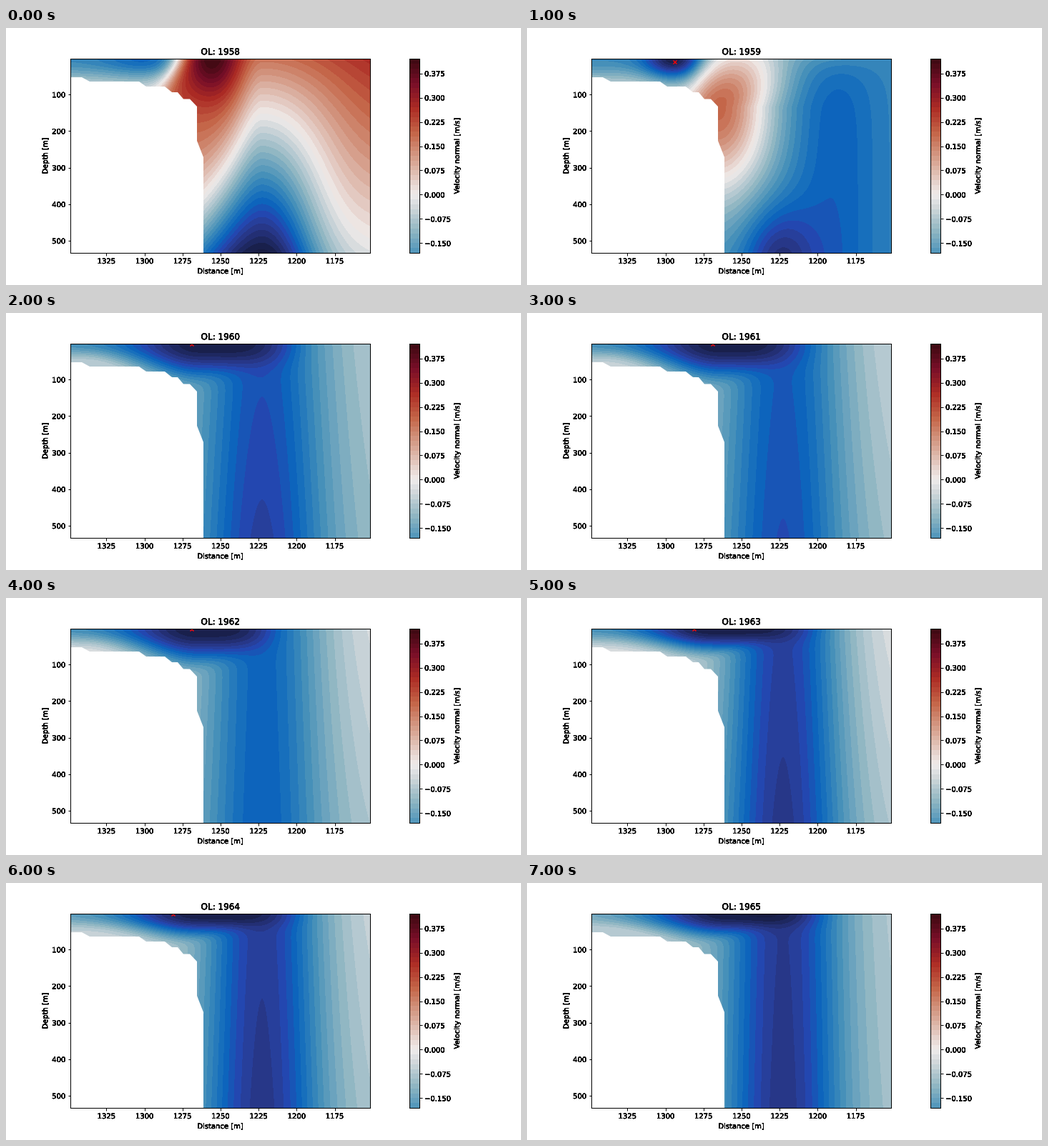
These frames come from a looping animation (720x360 px, 8000 ms). A matplotlib script:

```python
import numpy as np
import matplotlib.pyplot as plt
from matplotlib.animation import FuncAnimation
from matplotlib.colors import LinearSegmentedColormap, Normalize
from matplotlib.patheffects import Normal

W, H, DPI = 720, 360, 72
LEFT, RIGHT, TOP, BOTTOM = 90, 509.2, 43.2, 315
VMAX, STEP = 0.42, 0.02

# diverging blue / white / red map
STOPS = [
    (0, (23, 28, 66)), (0.091, (41, 58, 143)), (0.13, (36, 70, 176)),
    (0.182, (11, 102, 189)), (0.273, (69, 144, 185)), (0.364, (142, 181, 194)),
    (0.455, (210, 216, 219)), (0.5, (240, 236, 235)), (0.545, (230, 210, 204)),
    (0.636, (213, 157, 137)), (0.727, (196, 101, 72)), (0.818, (172, 43, 36)),
    (0.909, (120, 14, 40)), (1, (60, 9, 17)),
]
CMAP = LinearSegmentedColormap.from_list(
    "diverging", [(p, tuple(c / 255 for c in rgb)) for p, rgb in STOPS], N=512)
NORM = Normalize(-VMAX, VMAX)

# stage pixels; D is the depth below the surface, T the same from 0 to 1
X, Y = np.meshgrid(np.linspace(LEFT, RIGHT, 281), np.linspace(TOP, BOTTOM, 182))
D = Y - TOP
T = D / (BOTTOM - TOP)


def bell(v, mid, left, right=None):
    """Gaussian bump, with its own width on either side."""
    width = np.where(v < mid, left, left if right is None else right)
    return np.exp(-((v - mid) / width) ** 2)


def lerp(a, b):
    """Change from a at the surface to b at the bottom."""
    return a + (b - a) * T


# The fields are in percent of VMAX.

def join_shelf(open_sea, edge, flow, core, mid, width):
    """Put a cold current over the shelf, left of the slanting edge."""
    shelf = -(flow + core * bell(X, mid, width)) * bell(D, 0, 33)
    sea = 1 / (1 + np.exp((edge - 0.45 * D - X) / 9))
    return shelf + (open_sea - shelf) * sea


def arch():
    """Warm water above a cold dome, with a hot core at the surface."""
    dome = bell(X, 358, 35 + 70 * T ** 2, 80 + 50 * (1 - T) ** 2)
    sea = lerp(72, -3) - lerp(32, 100) * dome
    sea += 30 * bell(X, 288, 32) * bell(D, 0, 50)
    return join_shelf(sea, 243, 48, 16, 195, 60)


def wedge():
    """Cold sea with a warm wedge on the slope."""
    sea = -48 - 18 * bell(X, 430, 65) * (1 - np.exp(-D / 25))
    sea -= 38 * bell(X, 350, 50) * bell(Y, 330, 80)
    slant = 267 + 0.4 * np.maximum(110 - Y, 0)
    sea += 93 * bell(X, slant, 72) * bell(Y, 110, 90, 125)
    return join_shelf(sea, 248, 48, 52, 205, 40)


def jet(peak, rim, width, mid, shelf, spread, reach, depth):
    """Deep cold jet joined to a cold cap which thins out over the shelf."""
    rim = lerp(*rim)
    deep = rim + (lerp(*peak) - rim) * bell(X, 358, width)
    west = shelf + (100 - shelf) * bell(X, mid, spread)
    east = 100 * np.exp(-((X - mid) / reach) ** 4)
    s = np.clip((X - 110) / 160, 0, 1)
    thick = 22 + (depth - 22) * s * s * (3 - 2 * s)
    cap = np.where(X < mid, west, east) * bell(D, 0, thick)
    return -(deep ** 6 + cap ** 6) ** (1 / 6)


Y1960 = jet((69, 78), (15, 21), 95, 270, 43, 100, 153, 58)
Y1962 = jet((64, 66), (4, 15), 95, 265, 43, 98, 130, 55)
Y1963 = jet((77, 83), (2, 14), 92, 255, 43, 88, 165, 36)
Y1965 = jet((81, 84), (14, 18), 90, 280, 29, 115, 150, 38)

# field and position of the core marker
YEARS = [
    (arch(), None),
    (wedge(), (206, 47)),
    (Y1960, (258.5, 43)),
    ((Y1960 + Y1962) / 2, (258.5, 43)),
    (Y1962, (258.5, 43)),
    (Y1963, (233, 43)),
    ((Y1963 + Y1965) / 2, (233, 43)),
    (Y1965, None),
]

LAND = [(90, 69), (106, 69), (117, 75), (186, 75), (196, 82), (222, 82),
        (232, 90), (240, 90), (248, 99.5), (257, 99.5), (267, 110),
        (267, 158), (276, 181), (276, 315), (90, 315)]

plt.rcParams.update({"font.family": "DejaVu Sans", "axes.linewidth": 1,
                     "xtick.major.width": 1, "ytick.major.width": 1})
fig = plt.figure(figsize=(W / DPI, H / DPI), dpi=DPI, facecolor="white")


def add_axes(left, right):
    return fig.add_axes([left / W, 1 - BOTTOM / H,
                         (right - left) / W, (BOTTOM - TOP) / H])


ax = add_axes(LEFT, RIGHT)
ax.set_xlim(LEFT, RIGHT)
ax.set_ylim(BOTTOM, TOP)
ax.set_xticks([140.3 + 53.2 * k for k in range(7)],
              [str(1325 - 25 * k) for k in range(7)])
ax.set_yticks([93.2 + 51.2 * k for k in range(5)],
              [str(100 + 100 * k) for k in range(5)])
ax.set_xlabel("Distance [m]")
ax.set_ylabel("Depth [m]")
title = ax.set_title("OL: 1958")
ax.fill(*zip(*LAND), color="white", lw=0, zorder=1.5)
core, = ax.plot([], [], "x", color="red", ms=5, mew=1.4)

bar = add_axes(564.4, 578)
edges = np.linspace(-0.18, 0.42, 41)
mids = (edges[1:] + edges[:-1]) / 2
bar.pcolormesh([0, 1], edges, mids[:, None], cmap=CMAP, norm=NORM)
bar.set_ylim(-0.18, 0.42)
bar.set_xticks([])
bar.yaxis.tick_right()
bar.yaxis.set_label_position("right")
marks = np.arange(-2, 6) * 0.075
bar.set_yticks(marks, [f"{m:.3f}".replace("-", "\u2212") for m in marks])
bar.set_ylabel("Velocity normal [m/s]")

# lettering is laid down several times, which makes it heavier
for a in (ax, bar):
    for text in (a.title, a.xaxis.label, a.yaxis.label,
                 *a.get_xticklabels(), *a.get_yticklabels()):
        text.set_path_effects([Normal()] * 8)

levels = np.arange(-23, 24) * STEP
drawn = []


def update(i):
    while drawn:
        drawn.pop().remove()
    field, spot = YEARS[i]
    drawn.append(ax.contourf(X, Y, field * VMAX / 100, levels=levels, cmap=CMAP,
                             norm=NORM, extend="both", zorder=1))
    core.set_data(*([[c] for c in spot] if spot else ([], [])))
    title.set_text(f"OL: {1958 + i}")
    return [title, core]


anim = FuncAnimation(fig, update, frames=8, init_func=lambda: update(0),
                     interval=1000, repeat=True, repeat_delay=0, blit=False)
plt.show()
```
